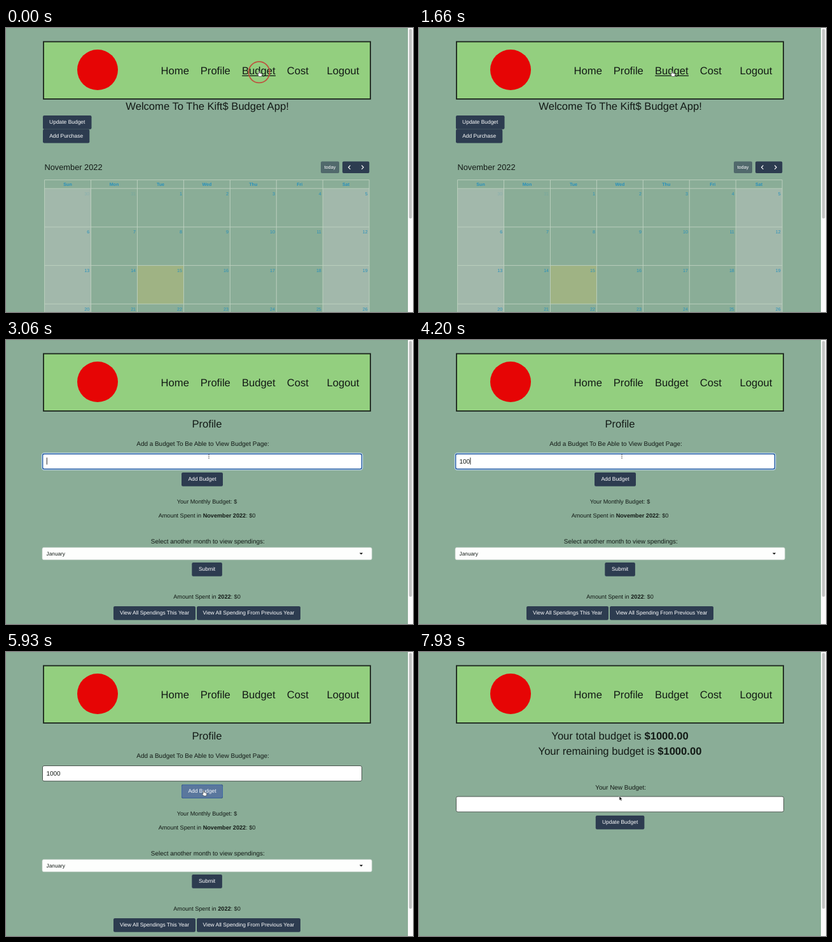
These frames come from a looping animation (640x448 px, 8930 ms). An HTML page:

```html
<!DOCTYPE html>
<html lang="en">
<head>
<meta charset="utf-8">
<title>Budget app</title>
<style>
html, body { margin: 0; height: 100%; overflow: hidden; background: #8aad97; }
svg { display: block; width: 100vw; height: 100vh; }
text {
  font-family: "Liberation Sans", Arial, sans-serif; fill: #131a16;
  white-space: pre; text-rendering: geometricPrecision;
}
.b { font-weight: bold; }
</style>
</head>
<body>
<svg id="stage" viewBox="0 0 640 448"></svg>
<script>
const LOOP = 8930, DARK = '#2d3c50', BLUE = '#2590bd';
const BIG = 16.6, MID = 9.95, NOTE = 9.15, SMALL = 8.45;

const rect = (x, y, w, h, fill, more = '') =>
  `<rect x="${x}" y="${y}" width="${w}" height="${h}" fill="${fill}" ${more}/>`;
const text = (s, x, y, size, anchor = 'middle', more = '') =>
  `<text x="${x}" y="${y}" font-size="${size}" text-anchor="${anchor}" ${more}>${s}</text>`;
const bold = s => `<tspan class="b">${s}</tspan>`;
const path = (d, more) => `<path d="${d}" ${more}/>`;
const group = (id, body) => `<g id="${id}">${body}</g>`;
const button = (label, x, y, w, h = 21.7) =>
  rect(x, y, w, h, DARK, 'rx="2.2"') +
  text(label, x + w / 2, y + 13.4, SMALL, 'middle', 'style="fill:#fff"');
const field = (x, y, w) =>
  rect(x + .5, y + .5, w - 1, 24.2, '#fff', 'rx="2.5" stroke="#4c5750"');

function nav() {
  const links = [['Home', 243.6], ['Profile', 305.8], ['Budget', 371], ['Cost', 441.8], ['Logout', 504.6]];
  return rect(59, 21.6, 514, 90.4, '#93cf7f', 'stroke="#1b241c" stroke-width="1.8"') +
    '<circle cx="144" cy="66" r="32" fill="#e60505"/>' +
    links.map(([s, x]) => text(s, x, 73, BIG, 'start')).join('');
}

function calendar() {
  const left = 60.6, col = 72.93, top = 253.2, row = 60.7, right = left + 7 * col;
  const rowY = r => top + r * row;
  const line = 'stroke="#c0d2c1" stroke-width=".9" fill="none"';
  let out = rect(left, top, col, 200, '#a2b8ab') + rect(right - col, top, col, 200, '#a2b8ab') +
    rect(left + 2 * col, rowY(2), col, row, '#9fb384');
  let grid = `M${left} 239.6H${right}`;
  for (let c = 0; c < 8; c++) grid += `M${left + c * col} 239.6V448`;
  for (let r = 0; r < 4; r++) grid += `M${left} ${rowY(r)}H${right}`;
  out += path(grid, line);
  ['Sun', 'Mon', 'Tue', 'Wed', 'Thu', 'Fri', 'Sat'].forEach((d, c) => {
    out += text(d, left + (c + .5) * col, 248.8, 7.1, 'middle', `class="b" style="fill:${BLUE}"`);
    for (let r = 0; r < 4; r++) {
      const n = r * 7 + c - 1;
      out += text(n < 1 ? n + 31 : n, left + (c + 1) * col - 2.4, rowY(r) + 10.3, 7.1, 'end',
        `style="fill:${BLUE}" opacity="${n < 1 ? .2 : 1}"`);
    }
  });
  return out;
}

const home =
  text('Welcome To The Kift$ Budget App!', 188.3, 129, BIG, 'start') +
  button('Update Budget', 58, 138, 76.5) +
  button('Add Purchase', 58, 159.7, 73.3) +
  text('November 2022', 60.5, 223.6, 12.8, 'start') +
  rect(495, 210.5, 29, 18.4, '#51696c', 'rx="2"') +
  text('today', 509.5, 222, 7.4, 'middle', 'style="fill:#fff"') +
  rect(529, 210.5, 42.3, 18.4, DARK, 'rx="2"') +
  path('M541.4 216.7l-2.9 3.1 2.9 3.1M559.2 216.7l2.9 3.1-2.9 3.1',
    'fill="none" stroke="#fff" stroke-width="1.2"') +
  calendar() +
  group('underline', path('M371.2 75.3H424', 'stroke="#131a16" stroke-width="1.3"'));

const profile =
  text('Profile', 316, 137.5, BIG) +
  text('Add a Budget To Be Able to View Budget Page:', 309.5, 167, MID) +
  field(57, 179, 503) +
  group('focus',
    rect(56.4, 178.4, 504.2, 26.4, 'none', 'rx="3.5" stroke="#b9d3ea" stroke-width="1.4"') +
    rect(57.7, 179.7, 501.6, 23.8, '#fff', 'rx="2.5" stroke="#2c62a6" stroke-width="1.4"')) +
  text('', 63.5, 194.6, MID, 'start', 'id="amount"') +
  group('caret', rect(0, 185.5, .9, 11, '#111')) +
  button('Add Budget', 276, 209, 65) +
  group('hover',
    rect(276.5, 209.5, 64, 20.8, '#5a779d', 'rx="2.2" stroke="#3f6aa3"') +
    text('Add Budget', 308.5, 222.4, SMALL, 'middle', 'style="fill:#fff"')) +
  text('Your Monthly Budget: $', 316, 258.4, NOTE) +
  text(`Amount Spent in ${bold('November 2022')}: $0`, 316, 280.2, NOTE) +
  text('Select another month to view spendings:', 317.3, 320.8, MID) +
  rect(57, 327.3, 518.3, 19.4, '#fdfefd', 'rx="2.5" stroke="#cbd5ce" stroke-width=".7"') +
  text('January', 63.5, 339.7, 8.3, 'start') +
  path('M555.8 335.7h5.4l-2.7 2.8z', 'fill="#111"') +
  button('Submit', 292.3, 351, 47.6) +
  text(`Amount Spent in ${bold('2022')}: $0`, 316, 407.5, NOTE) +
  button('View All Spendings This Year', 169, 420, 129) +
  button('View All Spending From Previous Year', 300, 420, 163);

const budget =
  text(`Your total budget is ${bold('$1000.00')}`, 316, 137.5, BIG) +
  text(`Your remaining budget is ${bold('$1000.00')}`, 316, 162.3, BIG) +
  text('Your New Budget:', 317.2, 216.7, MID) +
  field(58, 227.5, 516) +
  button('Update Budget', 277.8, 258, 76.6);

const pointers =
  group('arrow', path('M0 0V6.6L1.6 5.2 2.7 7.6 3.8 7.1 2.8 4.8H4.8Z',
    'fill="#111" stroke="#fff" stroke-width=".5"')) +
  group('hand', path('M0 0Q1-1 1.6 0V2.6L5 3.4Q6 3.7 5.7 5L5 8H1L-1.6 4.9Q-1.6 3.8 0 4.6Z',
    'fill="#fff" stroke="#333" stroke-width=".6"')) +
  group('beam', path('M0-4V4', 'stroke="#333" stroke-width="1" stroke-dasharray="1.6 1.2"')) +
  '<circle id="ring" r="16.6" fill="none" stroke="#bd5440" stroke-width="1.8"/>';

const stage = document.getElementById('stage');
stage.innerHTML = rect(0, 0, 640, 448, '#8aad97') + nav() +
  group('home', home) + group('profile', profile) + group('budget', budget) +
  rect(632, 0, 8, 448, '#fafafa') + rect(633.8, 1.5, 4.6, 299, '#c2c3c2', 'rx="2.3" id="thumb"') +
  pointers;

const $ = id => document.getElementById(id);
const show = (id, on) => $(id).style.display = on ? '' : 'none';
const place = (id, x, y) => $(id).setAttribute('transform', `translate(${x} ${y})`);

// [start time, click x, click y, ring life]
const clicks = [[0, 398, 69.8, 400], [2860, 319, 184, 200], [5530, 310, 220, 330]];
// [start, end, from x, from y, to x, to y]
const moves = [
  [1800, 2300, 397, 68.5, 319, 184],
  [4600, 5200, 319, 184, 310, 219],
  [7730, 7930, 311, 220, 315, 227.5]
];
const typed = [3860, 4000, 4130, 4330];

function pointerAt(t) {
  let [, , x, y] = moves[0];
  for (const [a, b, x0, y0, x1, y1] of moves) {
    if (t < a) break;
    const p = Math.min(1, (t - a) / (b - a)), e = p * p * (3 - 2 * p);
    x = x0 + (x1 - x0) * e;
    y = y0 + (y1 - y0) * e;
  }
  return [x, y];
}

function draw(t) {
  const within = (a, b) => t >= a && t < b;
  show('home', t < 1800);
  show('profile', within(1800, 6460));
  show('budget', t >= 6460);
  $('thumb').setAttribute('height', t < 1800 ? 299 : 403.5);

  const count = typed.filter(k => t >= k).length;
  $('amount').textContent = '1000'.slice(0, count);
  show('focus', within(2860, 5530));
  show('caret', within(2860, 3400) || within(3860, 4900));
  place('caret', 63.8 + count * MID * .556, 0);
  show('hover', t >= 5150);

  const [x, y] = pointerAt(t);
  show('hand', t < 1800 || within(5150, 6460));
  show('beam', within(2860, 4700));
  show('arrow', within(1800, 2300) || within(4700, 5150) || t >= 7730);
  for (const id of ['hand', 'beam', 'arrow']) place(id, x, y);

  const click = clicks.find(([a, , , life]) => within(a, a + life));
  show('ring', click);
  if (click) {
    place('ring', click[1], click[2]);
    $('ring').setAttribute('opacity', 1 - (t - click[0]) / click[3]);
  }
}

const start = performance.now();
function tick() {
  draw((performance.now() - start) % LOOP);
  requestAnimationFrame(tick);
}
tick();
</script>
</body>
</html>
```
